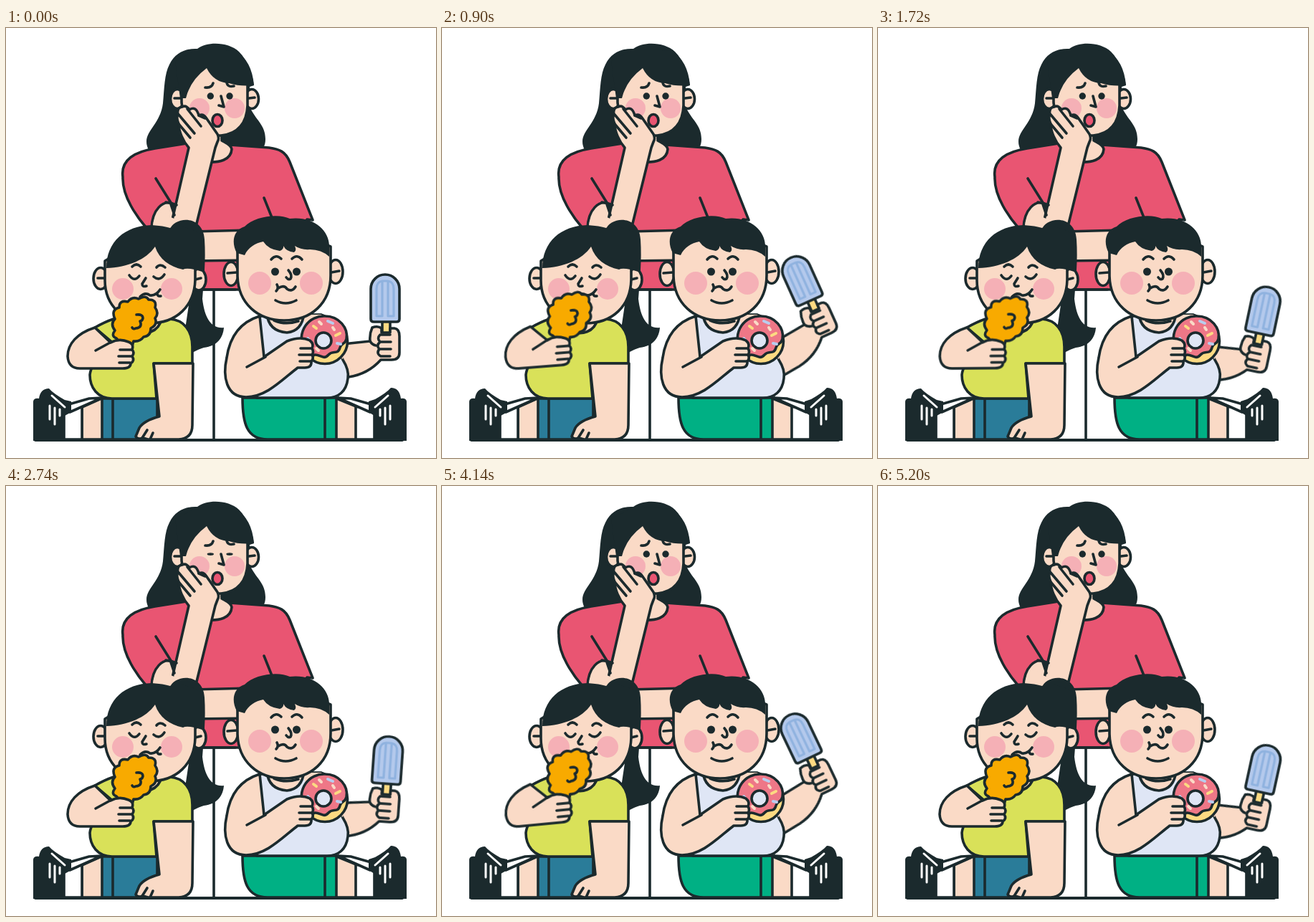
Animation, 600 px wide and 600 px high, one loop 6000 ms. Source, as an HTML page:

```html
<!DOCTYPE html>
<html lang="en">
<head>
<meta charset="utf-8">
<title>Worried mother and snacking kids</title>
<style>
html, body { margin: 0; width: 100%; height: 100%; overflow: hidden; background: #fff; }
svg { display: block; width: 100%; height: 100%; }
svg * { stroke-linecap: round; stroke-linejoin: round; }
.o { stroke: #1b2a2d; stroke-width: 3.6; }
.l { fill: none; stroke: #1b2a2d; stroke-width: 3.6; }
.k { fill: #1b2a2d; }
.skin { fill: #fadac6; }
.red { fill: #e95572; }
.lime { fill: #d9e159; }
.blue { fill: #2a7c99; }
.green { fill: #00b084; }
.tank { fill: #dfe6f5; }
.white { fill: #fff; }
.blush { fill: #f5b0b6; }
.gold { fill: #f8aa00; }
.cream { fill: #fcda82; }

.pop, .bite, .blink { animation: 6s cubic-bezier(.37, 0, .63, 1) infinite; }
.pop { animation-name: wave; transform-origin: 453px 431px; }
.bite { animation-name: bite; transform-origin: 105px 425px; }
.blink { animation-name: blink; transform-origin: 298px 95px; }

@keyframes wave {
  0%, 55.55% { transform: rotate(0deg); }
  13%, 68.55% { transform: rotate(-25.5deg); }
  30% { transform: rotate(12.5deg); }
  85.55%, 100% { transform: rotate(12.3deg); }
}
@keyframes bite {
  0%, 10.67%, 30%, 64.2%, 82.67%, 100% { transform: rotate(0deg); }
  20%, 73.3% { transform: rotate(-10deg); }
}
@keyframes blink {
  0%, 2.3%, 7.3%, 43.2%, 48.2%, 54.2%, 59.2%, 80.2%, 85.2%, 100% { transform: scaleY(1); }
  4.8%, 45.67%, 56.7%, 82.7% { transform: scaleY(.42); }
}
</style>
</head>
<body>
<svg viewBox="0 0 600 600">
  <!-- mother -->
  <path class="k" d="M199 170C187 146 215 138 219 105C221 84 221 64 228 51C236 34 252 28 267 29C282 18 311 20 325 33C337 45 344 65 346 80L340 82V110C348 128 362 135 362 155C362 165 358 171 350 174H205Z"/>
  <ellipse class="skin o" cx="239" cy="99" rx="9.5" ry="13.5"/>
  <ellipse class="skin o" cx="343" cy="99" rx="9.5" ry="13.5"/>
  <path class="l" d="M235 98H245M339 98L347 97"/>
  <path class="red o" d="M252 161L208 168C177 173 160 186 163 208C162 235 183 264 196 279L230 365H345L420 267L428 268L396 187C390 172 381 169 367 167L312 163Z"/>
  <path class="skin o" d="M278 150L272 186C300 190 314 183 315 169C314 163 306 160 301 157V145Z"/>
  <path class="skin" d="M245 80V104C247 132 268 152 300 150C324 148 336 132 337 108V78L285 50Z"/>
  <path class="l" d="M245 97V104C247 132 268 152 300 150C324 148 336 132 337 108V78"/>
  <path class="k" d="M243 98L251 98Q257 73 280 56Q290 76 311 77Q327 82 346 80Q343 45 320 32L270 28L236 46Z"/>
  <g class="blush"><circle cx="270" cy="112" r="14"/><circle cx="319" cy="112" r="14"/></g>
  <g class="k blink"><circle cx="285.3" cy="95" r="4.7"/><circle cx="312" cy="95" r="4.7"/></g>
  <path class="l" d="M278 83Q287 84 289 77M308 76Q309 83 318 81M300 95L304 110L297 108"/>
  <ellipse class="red o" cx="295" cy="129" rx="7" ry="8.5"/>
  <path class="skin" d="M203 279C204 254 219 238 235 246V283Z"/>
  <path class="l" d="M203 279C204 254 219 238 234 246M209 210L234 250M360 237L372 267"/>
  <path class="skin o" d="M262 284L340 282V324L262 325Z"/>
  <path class="skin o" d="M228 285L255 167C247 158 241 144 241 134Q237 125 240 121Q238 111 246 110Q251 107 256 114Q265 108 269 122Q275 119 279 125L295 148Q298 154 295 159L292 167L263 285"/>
  <path class="l" d="M241 134L257 153M241 121L263 147M253 113L272 137M269 122L278 126"/>
  <path class="skin" d="M205 282C204 262 216 248 230 264L265 279V284Z"/>
  <path class="l" d="M223 243Q231 244 238 247M230 246L235 261M270 365H320M290 366V575"/>

  <!-- legs and shoes -->
  <g id="foot">
    <path class="skin o" d="M106 574V529L135 516V574Z"/>
    <path class="white o" d="M81 574V537L90 532L106 528V574Z"/>
    <path class="white o" d="M88 525L116 517L134 516L89 536Z"/>
    <path class="k" d="M38 576V521Q39 516 46 517Q48 503 60 503Q66 510 82 519L91 521V536L82 541V576Z"/>
    <path d="M61 527V546M68 530V553M75 532V541M64 513L82 529" fill="none" stroke="#fff" stroke-width="3"/>
  </g>
  <g transform="matrix(-1 0 0 1 597 0)">
    <path class="skin o" d="M106 574V529L138 516V574Z"/>
    <path class="white o" d="M83 574V537L90 532L109 528V574Z"/>
    <path class="white o" d="M88 525L116 517L134 516L89 536Z"/>
    <path class="k" d="M38 576V521Q39 516 46 517Q48 502 60 502Q66 509 82 518L91 521V536L83 541V576Z"/>
    <path d="M61 527V546M68 530V553M75 532V541M64 513L82 529" fill="none" stroke="#fff" stroke-width="3"/>
  </g>

  <!-- girl -->
  <path class="k" d="M228 282C235 262 275 260 277 295C279 325 276 352 274 378C277 404 286 420 304 418C303 432 295 444 276 446Q269 448 260 453L250 420L256 380Z"/>
  <path class="blue o" d="M134 517H211V574H134ZM149 517V574"/>
  <path class="lime o" d="M124 418Q138 410 150 406H228C248 407 260 422 260 445V468H206L210 517H148C128 517 117 502 117 484Q118 476 122 470L150 440Z"/>
  <path class="skin o" d="M180 404L178 422C195 430 213 424 217 406Z"/>
  <path class="skin o" d="M206 468L214 542Q192 548 186 558L181 570Q184 575 191 572L198 574H241Q260 573 260 554L261 468Z"/>
  <path class="l" d="M190 572L197 561M201 574L205 565"/>
  <ellipse class="skin o" cx="132" cy="349.5" rx="10" ry="15"/>
  <ellipse class="skin o" cx="269" cy="351" rx="10" ry="15"/>
  <path class="l" d="M128 349H138M264 351L272 349"/>
  <path class="skin o" d="M138 325V352C138 388 165 412 200 412C238 412 263 388 264 351V325L205 285Z"/>
  <path class="k" d="M140 335C140 298 166 276 203 275Q220 276 229 279C248 272 276 285 277 300V341Q253 333 247 337C228 333 214 323 208 305C196 323 170 334 140 335Z"/>
  <g class="blush"><circle cx="163" cy="364" r="15"/><circle cx="231" cy="364" r="15"/></g>
  <path class="l" d="M176 333Q182 327 188 333M210 334Q215 328 222 334M172 345Q179 355 186 346M206 347Q214 354 221 344M195 349L190 357Q190 362 196 360M187 375Q194 368 201 373Q209 374 215 365M211 370Q211 375 216 374"/>
  <g class="bite">
    <path class="gold o" d="M160 440L154 433Q146 430 152 422Q145 413 152 406Q146 393 158 390Q158 379 170 382Q176 374 185 378Q195 372 199 379Q211 379 208 390Q214 398 208 405Q212 414 202 419Q202 430 192 431Q187 438 178 437L176 444Z"/>
    <path class="l" d="M182 400Q191 399 191 405Q190 409 187 409Q191 418 181 419Q178 421 176 418"/>
    <path class="skin o" d="M124 418C99 426 86 441 86 458Q87 475 103 475H163Q174 475 174 468Q180 464 176 458Q180 453 176 449Q179 441 171 438C162 434 153 435 146 439Z"/>
    <path class="l" d="M125 450L147 438M159 449H175M157 458H175M158 467H173"/>
  </g>

  <!-- boy -->
  <g class="pop">
    <rect class="cream o" x="525" y="405" width="11" height="22"/>
    <path class="o" fill="#b4c9ec" d="M509 406V364A20 20 0 0 1 549 364V406Q549 410 545 410H513Q509 410 509 406Z"/>
    <path fill="none" stroke="#8fb2df" stroke-width="3.2" d="M517 402V364Q517 354 525 353V402ZM533 402V353Q541 354 541 364V402ZM525 353H533"/>
    <path class="skin o" d="M430 458L470 441L508 437Q507 427 511 418Q519 415 524 419V425H536V419H542Q549 420 549 430V453Q549 463 538 463H523Q505 483 478 487L440 491Z"/>
    <path class="l" d="M536 428H522Q517 433 522 438H537M522 438Q516 443 521 448H537M521 448Q516 454 523 458H536M508 437Q511 442 516 443"/>
  </g>
  <path class="green o" d="M330 516C330 552 336 574 365 574H461V516ZM445 517V574"/>
  <path class="tank o" d="M352 403L365 400H440C456 410 461 440 470 463C477 474 478 483 477 489C475 507 464 516 448 516H350Z"/>
  <path class="skin" d="M412 400H442C462 408 472 430 474 450L470 462L425 430Z"/>
  <path class="l" d="M442 401Q459 407 467 425"/>
  <path class="skin o" d="M364 398Q366 423 392 425Q413 423 416 398Z"/>
  <path class="l" d="M374 408Q390 415 408 409"/>
  <circle class="cream o" cx="445" cy="437" r="31.5"/>
  <path class="o" fill="#ee7787" d="M416 452C404 421 424 401 445 402C465 402 478 419 475 434C473 442 468 439 466 446C463 457 456 449 450 456C443 464 438 455 431 456C425 458 420 462 416 452Z"/>
  <circle class="tank o" cx="443" cy="436" r="11"/>
  <g fill="none" stroke-width="4">
    <path stroke="#fcda82" d="M429 416L433 419M460 429L466 426M424 452L427 447"/>
    <path stroke="#b9cdee" d="M449 409L456 412M462 440L467 441M421 433L424 437"/>
    <path stroke="#fadac6" d="M437 410L440 413M456 418L458 421M433 447L436 450"/>
  </g>
  <path class="skin o" d="M354 402C325 411 312 432 308 460C302 486 307 515 335 515C363 515 385 491 407 474H417Q427 474 426 465Q430 461 427 456Q430 452 427 447Q430 441 424 436C414 431 402 433 392 437L360 459Z"/>
  <path class="l" d="M336 473L362 459M411 447H426M409 456H427M410 465H425"/>
  <ellipse class="skin o" cx="314" cy="343" rx="10" ry="16.5"/>
  <ellipse class="skin o" cx="460" cy="340" rx="10" ry="16.5"/>
  <path class="l" d="M309 342L322 341M454 341L465 339"/>
  <path class="skin o" d="M323 305V346C324 385 352 408 388 408C426 408 453 384 453 345V305L390 280Z"/>
  <path class="k" d="M322 314C314 299 317 282 333 277C346 263 380 258 396 266C428 262 452 282 451 306V319Q440 309 424 309Q412 310 403 304Q406 311 402 313Q391 312 387 304Q388 309 382 311Q366 309 359 298C348 300 338 306 333 317Z"/>
  <g class="blush"><circle cx="354" cy="356" r="16"/><circle cx="426" cy="356" r="16"/></g>
  <g class="k"><circle cx="375.5" cy="340" r="5.5"/><circle cx="405.5" cy="340" r="5.5"/></g>
  <path class="l" d="M370 323Q377 315 384 322M399 322Q406 315 413 323M394 338Q400 345 397 350Q394 352 391 348M378 358Q381 363 377 367M380 363Q388 358 392 364Q399 369 404 361M376 380Q390 388 405 380"/>
  <path class="l" style="stroke-width:4" d="M41 575H553"/>
</svg>
</body>
</html>
```
